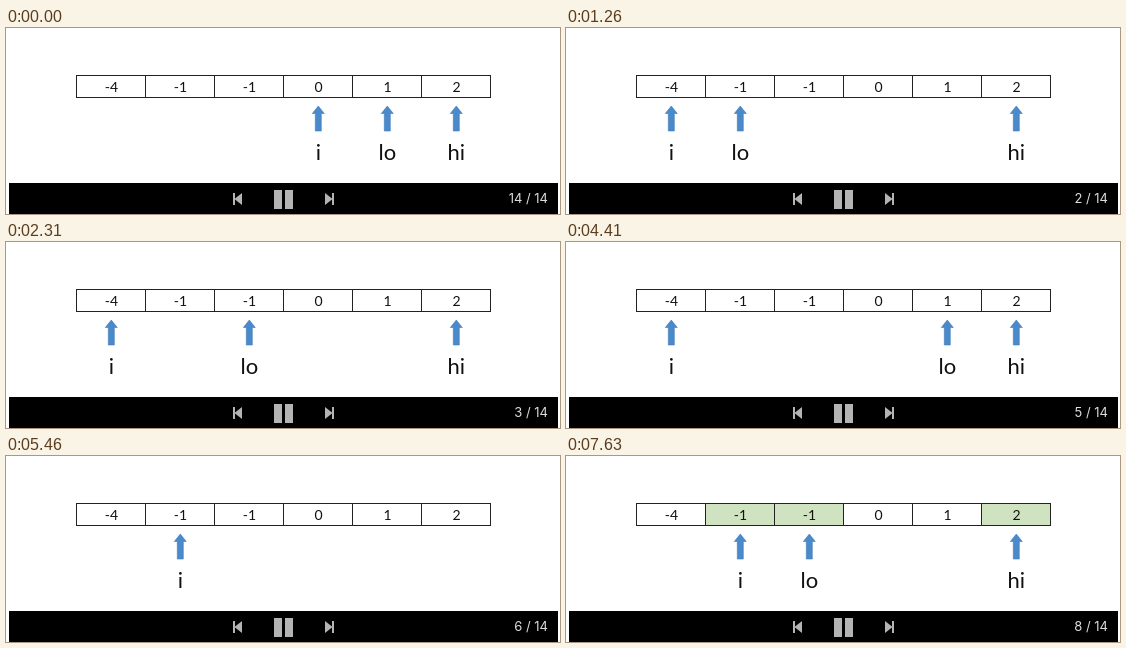
Animation, 554 px wide and 186 px high, one loop 8000 ms. Source, as an HTML page:

```html
<!DOCTYPE html>
<html lang="en">
<head>
<meta charset="utf-8">
<style>
  html, body { margin: 0; width: 100%; height: 100%; overflow: hidden; background: #fff; }
  svg { display: block; width: 554px; height: 186px; }
  text { font-family: Lato, "Open Sans", sans-serif; fill: #111; text-anchor: middle; }
  .value { font-size: 14px; }
  .label { font-size: 22px; }
  .count { font: 13px Inter, Roboto, sans-serif; fill: #ddd; text-anchor: end; }
  .grid { fill: none; stroke: #222; shape-rendering: crispEdges; }
  .mark { fill: #d0e3c1; }
  .arrow { fill: #4a8acb; stroke: #427bb5; stroke-width: .6; }
  .icon { fill: #b4b4b4; }
</style>
</head>
<body>
<svg viewBox="0 0 554 186">
  <g id="marks"></g>
  <path class="grid" d="M70.5 47.5H484.5V69.5H70.5ZM139.5 47V70M208.5 47V70M277.5 47V70M346.5 47V70M415.5 47V70"/>
  <g id="values"></g>
  <rect x="3" y="155" width="549" height="31"/>
  <path class="icon" d="M227 165h2v5.5l7-5.5v12l-7-5.5v5.5h-2zM268 162h8v19h-8zM279 162h8v19h-8zM319 165l7 5.5v-5.5h2v12h-2v-5.5l-7 5.5z"/>
  <g id="slides"></g>
</svg>
<script>
const LOOP = 8000;
const labels = ["i", "lo", "hi"];
// start time, slide number, cells pointed at by i, lo, hi
const slides = [
  [0, 14, [3, 4, 5]],
  [70, 1, [0]],
  [1260, 2, [0, 1, 5]],
  [2310, 3, [0, 2, 5]],
  [3360, 4, [0, 3, 5]],
  [4410, 5, [0, 4, 5]],
  [5460, 6, [1]],
  [6510, 7, [1, 2, 5]],
  [7630, 8, [1, 2, 5]]
];
const byId = id => document.getElementById(id);
const center = cell => 105 + cell * 69;
const text = (cls, x, y, s) => `<text class="${cls}" x="${x}" y="${y}">${s}</text>`;

const pointer = (cell, n) => {
  const x = center(cell) + 0.3;
  return `<path class="arrow" d="M${x} 78l6 7.5h-3v17.5h-6v-17.5h-3z"/>` +
    text("label", x, 131.5, labels[n]);
};

byId("values").innerHTML = [-4, -1, -1, 0, 1, 2]
  .map((v, i) => text("value", center(i) + 0.5, 64, v)).join("");
byId("marks").innerHTML = [1, 2, 5]
  .map(i => `<rect class="mark" x="${71 + i * 69}" y="48" width="68" height="21"/>`).join("");
byId("slides").innerHTML = slides.map(([, num, cells]) =>
  `<g>${cells.map(pointer).join("")}${text("count", 542, 175, num + " / 14")}</g>`).join("");
const layers = [...byId("slides").children];

function draw(now) {
  const t = now % LOOP;
  const current = slides.findLastIndex(s => t >= s[0]);
  // the restart dissolves in three steps
  const mix = current === 1 ? Math.min(1, Math.floor(t / 70) / 3) : 1;
  layers.forEach((g, i) => {
    const alpha = i === current ? mix : i === current - 1 ? 1 - mix : 0;
    g.setAttribute("opacity", alpha);
  });
  byId("marks").setAttribute("opacity", slides[current][1] === 8 ? 1 : 0);
}

const start = performance.now();
function tick() {
  draw(performance.now() - start);
  requestAnimationFrame(tick);
}
tick();
</script>
</body>
</html>
```
